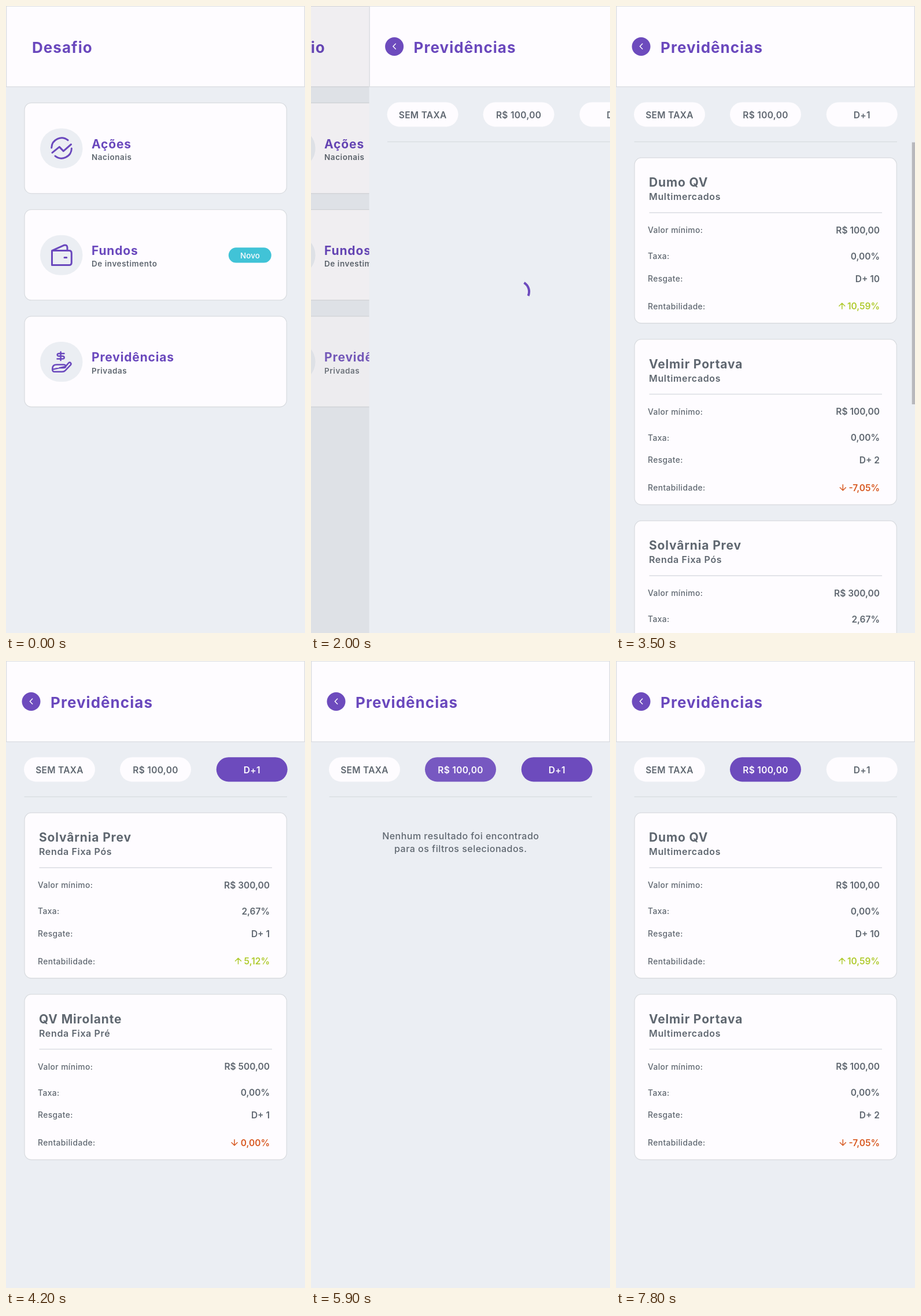
An HTML page for the animation above (8000 ms loop, 517 px wide and 1083 px high).

```html
<!DOCTYPE html>
<html lang="pt-BR">
<head>
<meta charset="utf-8">
<title>Desafio</title>
<style>
  html, body { margin: 0; width: 100%; height: 100%; overflow: hidden; background: #ebeef3; }
  svg { display: block; width: 100vw; height: 100vh; }
  text { font-family: Inter, "Open Sans", sans-serif; fill: #5f6770; white-space: pre; }
  .h1, .h2, .fund { font-weight: 700; letter-spacing: .04em; }
  .h1 { font-size: 26px; fill: #6a48bd; }
  .h2 { font-size: 21px; fill: #6a48bd; }
  .fund { font-size: 21px; }
  .sub { font-size: 13.5px; font-weight: 600; letter-spacing: .04em; }
  .kind { font-size: 16px; font-weight: 600; letter-spacing: .04em; }
  .label { font-size: 13.8px; font-weight: 500; letter-spacing: .03em; }
  .value { font-size: 15.5px; font-weight: 600; text-anchor: end; }
  .chip { font-size: 15.5px; font-weight: 600; letter-spacing: .02em; text-anchor: middle; }
  .note { font-size: 16px; font-weight: 500; letter-spacing: .03em; text-anchor: middle; }
  .badge { font-size: 13.5px; font-weight: 500; text-anchor: middle; fill: #fefcff; }
  .panel { fill: #fefcff; stroke: #d9dce0; stroke-width: 1.3; }
  .rule { stroke: #d9dde2; stroke-width: 1.6; }
  .icon { fill: none; stroke: #6a48bd; stroke-width: 3; stroke-linecap: round; stroke-linejoin: round; }
</style>
</head>
<body>
<svg id="stage" viewBox="0 0 517 1083" preserveAspectRatio="none"></svg>
<script>
const LOOP = 8000, W = 517, H = 1083;
const PURPLE = '#6d4bbd', WHITE = '#fefcff', GRAY = '#5f6770', BG = '#ebeef3';
const GREEN = '#b0cb2f', ORANGE = '#d85a23';

// Moments of the story, in ms
const PUSH = 1835, CARD_TAP = 1770, SPIN = 1825, LOADED = 2600;
const TAP_ON_D1 = 3650, TAP_ON_MIN = 5630, TAP_OFF_D1 = 7350;
const TAP_DELAY = 90, TAP_FADE = 250, TAP_DEPTH = .3;

const text = (cls, x, y, s, extra = '') => `<text class="${cls}" x="${x}" y="${y}" ${extra}>${s}</text>`;
const panel = (x, y, w, h, r) => `<rect class="panel" x="${x}" y="${y}" width="${w}" height="${h}" rx="${r}"/>`;
const rule = (x1, x2, y) => `<path class="rule" d="M${x1} ${y}H${x2}"/>`;
const page = () => `<rect width="${W}" height="${H}" fill="${BG}"/>` + panel(.6, .2, 515.8, 139.3, 0);

const icons = [
  '<path d="M78.7 245A17.5 17.5 0 0 1 107 231.8M113.4 246A17.5 17.5 0 0 1 85 259.2M80 253.4L92.3 243.4L99.3 250.6L112.5 239"/>',
  '<path d="M79.5 238.3H109Q113.3 238.3 113.3 242.6V259Q113.3 263.3 109 263.3H79.5ZM80 238L100 229Q105.8 227.6 106 233V238M101 250.3H104.8"/>',
  '<path stroke-width="2.5" d="M94.6 229V243.4M100.5 231.7H92Q88.7 231.7 88.7 234T92 236.2H97.3Q100.7 236.2 100.7 238.6T97.3 241H88.5"/>' +
  '<path stroke-width="2.5" d="M80.3 259.3V258Q80.3 251 87.5 251H99Q103.3 251 103.3 253.6T99 256.4H92.5M103 254L108.5 247.7Q110.3 246.3 111.8 248T111.6 251.5L102.5 261Q100.6 263.2 97 263.2H84Q80.3 263.2 80.3 259.3Z"/>'
];

const option = (i, title, sub, extra = '') => `
  <g id="option${i}" transform="translate(0 ${i * 184.3})">
    ${panel(32, 167.3, 453.3, 156.6, 12)}
    <rect x="59" y="211.5" width="73.5" height="69" rx="34.5" fill="${BG}"/>
    <g class="icon">${icons[i]}</g>
    ${text('h2', 148, 245.8, title)}${text('sub', 148, 266, sub)}${extra}
  </g>`;

const chip = (id, x, label) => `
  <g id="${id}">
    <rect x="${x}" y="166.2" width="123" height="42.2" rx="21.1" fill="${WHITE}"/>
    ${text('chip', x + 61.5, 193.8, label)}
  </g>`;

// name, kind, minimum, fee, redemption, yield, arrow x
const funds = {
  a: ['Dumo QV', 'Multimercados', '100', '0,00', '10', '10,59', 390.8],
  b: ['Velmir Portava', 'Multimercados', '100', '0,00', '2', '-7,05', 392.3],
  c: ['Solvârnia Prev', 'Renda Fixa Pós', '300', '2,67', '1', '5,12', 401.5],
  d: ['QV Mirolante', 'Renda Fixa Pré', '500', '0,00', '1', '0,00', 395]
};

function fundCard([name, kind, min, fee, days, gain, ax], i) {
  const up = parseFloat(gain) > 0, color = up ? GREEN : ORANGE;
  const rows = [['Valor mínimo:', `R$ ${min},00`, 392], ['Taxa:', fee + '%', 437],
                ['Resgate:', 'D+ ' + days, 475.7], ['Rentabilidade:', gain + '%', 523.5]];
  const body = rows.map(([label, value, y], n) => text('label', 55, y, label) +
    text('value', 456, y + .8, value, n === 3 ? `style="fill:${color}"` : '')).join('');
  const arrow = `<path transform="translate(${ax} 518.3) scale(1 ${up ? 1 : -1})" d="M0 5V-5M-5 0L0 -5L5 0"
    fill="none" stroke="${color}" stroke-width="1.5" stroke-linecap="round" stroke-linejoin="round"/>`;
  return `<g transform="translate(0 ${i * 313.5})">${panel(32, 262.2, 453.3, 285.8, 12)}
    ${text('fund', 57, 312.3, name)}${text('kind', 57, 335.3, kind)}${rule(57.5, 460, 357)}${body}${arrow}</g>`;
}

const list = keys => [...keys].map((k, i) => fundCard(funds[k], i)).join('');
const views = {
  all: list('abc') + '<rect x="511.7" y="235.5" width="5.3" height="452.5" fill="#b8b8bc"/>',
  d1: list('cd'),
  min: list('ab'),
  none: text('note', 258.8, 308.3, 'Nenhum resultado foi encontrado') +
    text('note', 258.8, 329.5, 'para os filtros selecionados.')
};

const badge = `<rect x="384.8" y="233" width="74" height="26.2" rx="13.1" fill="#41c3d7"/>` +
  text('badge', 422, 251.7, 'Novo');

document.getElementById('stage').innerHTML = `
  <g id="home">
    ${page()}${text('h1', 45, 81, 'Desafio')}
    ${option(0, 'Ações', 'Nacionais')}
    ${option(1, 'Fundos', 'De investimento', badge)}
    ${option(2, 'Previdências', 'Privadas')}
  </g>
  <rect id="shade" width="${W}" height="${H}"/>
  <g id="detail">
    ${page()}
    <circle cx="43.5" cy="70" r="16" fill="${PURPLE}"/>
    <path d="M45.7 65.3L41.3 69.8L45.7 74.3" fill="none" stroke="#fff" stroke-width="1.4" stroke-linecap="round" stroke-linejoin="round"/>
    ${text('h1', 77, 81, 'Previdências')}
    ${chip('chipFee', 31, 'SEM TAXA')}${chip('chipMin', 197, 'R$ 100,00')}${chip('chipD1', 363.7, 'D+1')}
    ${rule(31.5, 486, 234.5)}
    <path id="spinner" fill="none" stroke="${PURPLE}" stroke-width="4"/>
    ${Object.entries(views).map(([id, html]) => `<g id="view-${id}">${html}</g>`).join('')}
  </g>`;

const $ = id => document.getElementById(id);
const show = (el, on) => { el.style.display = on ? '' : 'none'; };
const clamp = v => Math.min(1, Math.max(0, v));

// cubic-bezier(.4, 0, .2, 1)
function ease(x) {
  let lo = 0, hi = 1, s = .5;
  for (let i = 0; i < 18; i++) {
    s = (lo + hi) / 2;
    const bx = 1.2 * s * (1 - s) ** 2 + .6 * s * s * (1 - s) + s ** 3;
    if (bx < x) lo = s; else hi = s;
  }
  return 3 * s * s * (1 - s) + s ** 3;
}

// Opacity dip of a tapped element
function dip(t, start) {
  const d = t - start;
  const depth = d < TAP_DELAY ? clamp(d / TAP_DELAY) : 1 - clamp((d - TAP_DELAY) / TAP_FADE);
  return 1 - TAP_DEPTH * depth;
}

// Critically damped spring, from 1 to 0
function spring(ms) {
  const u = Math.sqrt(1000 / 3) * Math.max(0, ms) / 1000;
  return Math.exp(-u) * (1 + u);
}

function arc(t) {
  const half = 1333 / 2, p = (t - SPIN) / half;
  const head = 267 * ease(clamp(p)), tail = 267 * ease(clamp(p - 1));
  const start = -59 + .215 * (t - 2000) + tail, end = start + 10 + head - tail;
  const at = deg => {
    const a = deg * Math.PI / 180;
    return `${258.5 + 18 * Math.cos(a)} ${493.4 + 18 * Math.sin(a)}`;
  };
  return `M${at(start)}A18 18 0 ${end - start > 180 ? 1 : 0} 1 ${at(end)}`;
}

function paintChip(id, on, opacity) {
  const [box, label] = $(id).children;
  box.setAttribute('fill', on ? PURPLE : WHITE);
  label.style.fill = on ? WHITE : GRAY;
  $(id).setAttribute('opacity', opacity);
}

function draw(t) {
  const rest = spring(t - PUSH);
  $('home').setAttribute('transform', `translate(${-.3 * W * (1 - rest)} 0)`);
  $('detail').setAttribute('transform', `translate(${W * rest} 0)`);
  $('shade').setAttribute('opacity', .07 * (1 - rest));
  $('option2').setAttribute('opacity', dip(t, CARD_TAP));
  show($('detail'), t > PUSH);

  const loading = t < LOADED;
  show($('spinner'), loading);
  if (loading && t > PUSH) $('spinner').setAttribute('d', arc(t));

  const d1 = t >= TAP_ON_D1 + TAP_DELAY && t < TAP_OFF_D1 + TAP_DELAY;
  const min = t >= TAP_ON_MIN + TAP_DELAY;
  paintChip('chipMin', min, dip(t, TAP_ON_MIN));
  paintChip('chipD1', d1, Math.min(dip(t, TAP_ON_D1), dip(t, TAP_OFF_D1)));

  const view = loading ? '' : d1 ? (min ? 'none' : 'd1') : min ? 'min' : 'all';
  for (const id in views) show($('view-' + id), id === view);
}

const begin = performance.now();
function tick() {
  draw((performance.now() - begin) % LOOP);
  requestAnimationFrame(tick);
}
tick();
</script>
</body>
</html>
```
